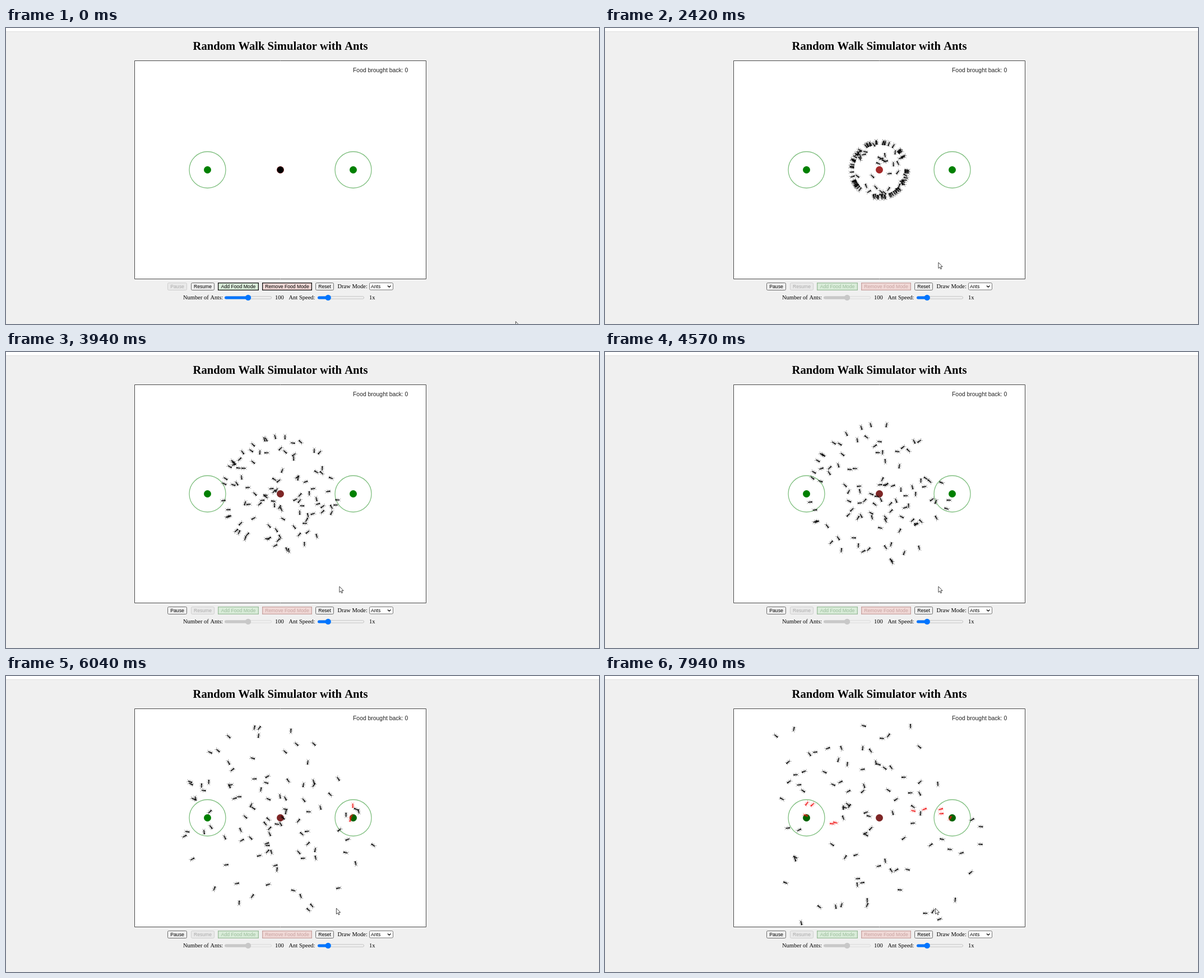
Write an HTML page with a canvas that moves like this. It is 1058 by 529 pixels and loops after 8000 ms.

```html
<!DOCTYPE html>
<html lang="en">
<head>
<meta charset="utf-8">
<title>Random Walk Simulator with Ants</title>
<style>
  html, body { margin: 0; width: 100%; height: 100%; overflow: hidden; background: #f0f0f0; }
  canvas { display: block; }
</style>
</head>
<body>
<canvas id="stage" width="1058" height="529"></canvas>
<script>
const ctx = document.getElementById('stage').getContext('2d');
const LOOP = 8000, START = 1010, SPEED = 0.035;
const NEST = { x: 489.5, y: 253.5 };
const SANS = '"Liberation Sans", Arial, sans-serif';
const SERIF = '"Liberation Serif", "Times New Roman", serif';

let seed = 20417;
function rand() {
  seed = (seed + 0x6D2B79F5) | 0;
  let r = Math.imul(seed ^ (seed >>> 15), 1 | seed);
  r = (r + Math.imul(r ^ (r >>> 7), 61 | r)) ^ r;
  return ((r ^ (r >>> 14)) >>> 0) / 4294967296;
}
const between = (lo, hi) => lo + (hi - lo) * rand();

// Straight out from the nest, then a fresh heading after every stretch.
// Steady ants mostly keep their course, the others turn anywhere.
function wander(_, i) {
  let t = START, { x, y } = NEST, heading = (i + rand()) * 2.4;
  const steadiness = rand() ** 2;
  const path = [{ t, x, y }];
  while (t < LOOP) {
    const span = between(740, 1550);
    t += span;
    x += Math.cos(heading) * span * SPEED;
    y += Math.sin(heading) * span * SPEED;
    path.push({ t, x, y });
    heading += rand() < steadiness ? between(-0.4, 0.4) : between(-Math.PI, Math.PI);
  }
  return { pickTime: Infinity, path };
}

// The one corner point that makes the trip from a to b last exactly b.t - a.t.
function corner(a, b, turn) {
  const dx = b.x - a.x, dy = b.y - a.y;
  const direct = Math.hypot(dx, dy), length = (b.t - a.t) * SPEED;
  const d = Math.max(0.01, (length ** 2 - direct ** 2) / (2 * (length - direct * Math.cos(turn))));
  const angle = Math.atan2(dy, dx) + turn;
  return { t: a.t + d / SPEED, x: a.x + Math.cos(angle) * d, y: a.y + Math.sin(angle) * d };
}

// Pick-up time, pick-up point, place at the end of the loop.
const carriers = [
  [7300, 346, 240, 360, 228], [7100, 349, 242, 370, 230], [7800, 359, 251, 358, 249],
  [6500, 356, 257, 405, 264], [6350, 356, 250, 411, 262], [5880, 613, 262, 550, 241],
  [5800, 619, 240, 570, 238], [6000, 615, 252, 599, 238], [6900, 618, 256, 600, 246],
  [7700, 620, 252, 616, 254]
].map(([t, x, y, endX, endY], i) => {
  const start = { t: START, ...NEST }, pick = { t, x, y }, end = { t: 7940, x: endX, y: endY };
  const turn = (i % 2 ? -1 : 1) * (0.4 + 0.09 * i);
  return { pickTime: t, path: [start, corner(start, pick, turn), pick, corner(pick, end, 1.5), end] };
});
const ants = Array.from({ length: 90 }, wander).concat(carriers);

function segment(path, t) {
  let i = 1;
  while (i < path.length - 1 && path[i].t < t) i++;
  const a = path[i - 1], b = path[i];
  const k = Math.min(1, Math.max(0, (t - a.t) / (b.t - a.t || 1)));
  return { x: a.x + (b.x - a.x) * k, y: a.y + (b.y - a.y) * k, dx: b.x - a.x, dy: b.y - a.y };
}

// Bounces a coordinate between two walls and returns its new direction.
function bounce(v, dir, lo, hi) {
  if (v < lo) return [2 * lo - v, -dir];
  if (v > hi) return [2 * hi - v, -dir];
  return [v, dir];
}

function drawAnt(ant, t) {
  const p = segment(ant.path, t);
  const [x, dx] = bounce(p.x, p.dx, 302, 671);
  const [y, dy] = bounce(p.y, p.dy, 89, 442);
  ctx.save();
  ctx.translate(x, y);
  ctx.rotate(Math.atan2(dy, dx));
  ctx.fillStyle = ctx.strokeStyle = t >= ant.pickTime ? '#f01414' : '#000';
  ctx.beginPath();
  for (const s of [-1, 1]) {
    ctx.moveTo(2.8, 0); ctx.lineTo(5.6, s * 2.6);
    ctx.moveTo(0.8, 0); ctx.lineTo(1.8, s * 3.2);
    ctx.moveTo(0, 0); ctx.lineTo(-0.7, s * 3.4);
    ctx.moveTo(-0.6, 0); ctx.lineTo(-4.4, s * 3);
  }
  ctx.lineWidth = 0.5;
  ctx.globalAlpha = 0.7;
  ctx.stroke();
  ctx.globalAlpha = 1;
  ctx.beginPath();
  for (const [cx, rx, ry] of [[-2.6, 1.9, 1], [0.2, 1.5, 0.7], [2.4, 1.1, 0.9]]) {
    ctx.moveTo(cx + rx, 0);
    ctx.ellipse(cx, 0, rx, ry, 0, 0, Math.PI * 2);
  }
  ctx.fill();
  ctx.restore();
}

function text(str, x, y, font, color = '#000', align = 'left') {
  ctx.font = font;
  ctx.fillStyle = color;
  ctx.textAlign = align;
  ctx.fillText(str, x, y);
}

function disc(x, y, r, color) {
  ctx.beginPath();
  ctx.arc(x, y, r, 0, Math.PI * 2);
  ctx.fillStyle = color;
  ctx.fill();
}

function box(x, y, w, h, radius, fill, stroke, lineWidth = 1) {
  ctx.beginPath();
  ctx.roundRect(x, y, w, h, radius);
  ctx.fillStyle = fill;
  ctx.fill();
  ctx.strokeStyle = stroke;
  ctx.lineWidth = lineWidth;
  ctx.stroke();
}

function button(label, x, w, enabled, hover) {
  box(x + 0.5, 455.5, w - 1, 13, 2, enabled ? (hover ? '#e3e3e3' : '#efefef') : '#e9e9e9',
    enabled ? '#6e6e6e' : '#cfcfcf');
  text(label, x + w / 2, 465, '8.67px ' + SANS, enabled ? '#000' : '#aaa', 'center');
}

function modeButton(label, x, w, enabled, fill, faded) {
  box(x + 0.65, 455.65, w - 1.3, 12.7, 0, fill, enabled ? '#111' : faded, 1.3);
  text(label, x + w / 2, 465, '8.67px ' + SANS, enabled ? '#000' : faded, 'center');
}

function slider(x, w, thumb, enabled) {
  const color = enabled ? '#0075ff' : '#c8c8c8';
  box(x + 0.4, 479.7, w - 0.8, 4.4, 2.2, '#efefef', enabled ? '#b2b2b2' : '#d2d2d2', 0.7);
  ctx.beginPath();
  ctx.roundRect(x, 479.4, thumb - x, 5, 2.5);
  ctx.fillStyle = color;
  ctx.fill();
  disc(thumb, 481.9, 5.2, color);
}

function drawPage(t) {
  const running = t >= START;
  ctx.fillStyle = '#f0f0f0';
  ctx.fillRect(0, 0, 1058, 529);
  ctx.fillStyle = '#fff';
  ctx.fillRect(0, 0, 1058, 6);
  ctx.fillStyle = '#dedede';
  ctx.fillRect(0, 6, 1058, 1);
  text('Random Walk Simulator with Ants', 489.5, 39, 'bold 20.65px ' + SERIF, '#000', 'center');
  box(229.5, 58.5, 520, 390, 0, '#fff', '#484848');

  button('Pause', 288, 35, running, false);
  button('Resume', 330, 42, !running, t > 690);
  modeButton('Add Food Mode', 378, 73, !running, '#d9ecd9', '#9cbd9c');
  modeButton('Remove Food Mode', 457, 89, !running, '#f0d8d6', '#c8a3a1');
  button('Reset', 552, 33, true, false);

  const label = '10.5px ' + SERIF;
  text('Draw Mode:', 591.5, 465, label);
  box(648.5, 455.5, 42, 12.5, 2, '#fff', '#767676');
  text('Ants', 651, 465, '8.67px ' + SANS);
  ctx.beginPath();
  ctx.moveTo(681, 460.5); ctx.lineTo(683.7, 463.2); ctx.lineTo(686.4, 460.5);
  ctx.strokeStyle = '#000';
  ctx.lineWidth = 1.3;
  ctx.stroke();

  text('Number of Ants:', 316, 485, label);
  slider(390, 84, 432, !running);
  text('100', 480, 485, label);
  text('Ant Speed:', 504.5, 485, label);
  slider(556, 83, 574.7, true);
  text('1x', 648, 485, label);
}

function drawFood(x, color) {
  disc(x, 253.5, 6.5, color);
  ctx.beginPath();
  ctx.arc(x, 253.5, 32.5, 0, Math.PI * 2);
  ctx.strokeStyle = 'rgba(0,128,0,0.5)';
  ctx.lineWidth = 1.3;
  ctx.stroke();
}

function drawWorld(t) {
  drawFood(359.5, t < 6700 ? '#008000' : '#006400');
  drawFood(619.5, t < 5900 ? '#008000' : '#006400');
  disc(NEST.x, NEST.y, 6.5, t < 3500 ? '#a52a2a' : '#7e2626');
  if (t < START) disc(NEST.x, NEST.y, 5.9, '#000');
  else for (const ant of ants) drawAnt(ant, t);
  text('Food brought back: 0', 619, 78.5, '10.4px ' + SANS, '#222');
}

const pointer = [
  [0, 909, 524], [60, 909, 524], [170, 780, 500], [400, 500, 445], [650, 370, 456], [830, 352, 461],
  [1050, 352, 461], [1400, 480, 440], [1650, 593, 422], [1750, 593, 422], [2000, 594.5, 418.5],
  [5500, 594.5, 418.5], [5600, 589, 414.5], [LOOP, 589, 414.5]
].map(([t, x, y]) => ({ t, x, y }));

function drawPointer(t) {
  const { x, y } = segment(pointer, t);
  ctx.save();
  ctx.translate(x, y);
  ctx.beginPath();
  ctx.moveTo(0.4, 0.5);
  for (const [px, py] of [[0.4, 11], [2.8, 8.8], [4.4, 12.4], [6, 11.7], [4.5, 8.2], [7.6, 8]]) ctx.lineTo(px, py);
  ctx.closePath();
  ctx.fillStyle = '#fff';
  ctx.fill();
  ctx.strokeStyle = '#222';
  ctx.lineWidth = 0.85;
  ctx.stroke();
  ctx.restore();
}

const begin = performance.now();
function frame() {
  const t = (performance.now() - begin) % LOOP;
  drawPage(t);
  drawWorld(t);
  drawPointer(t);
  requestAnimationFrame(frame);
}
frame();
</script>
</body>
</html>
```
